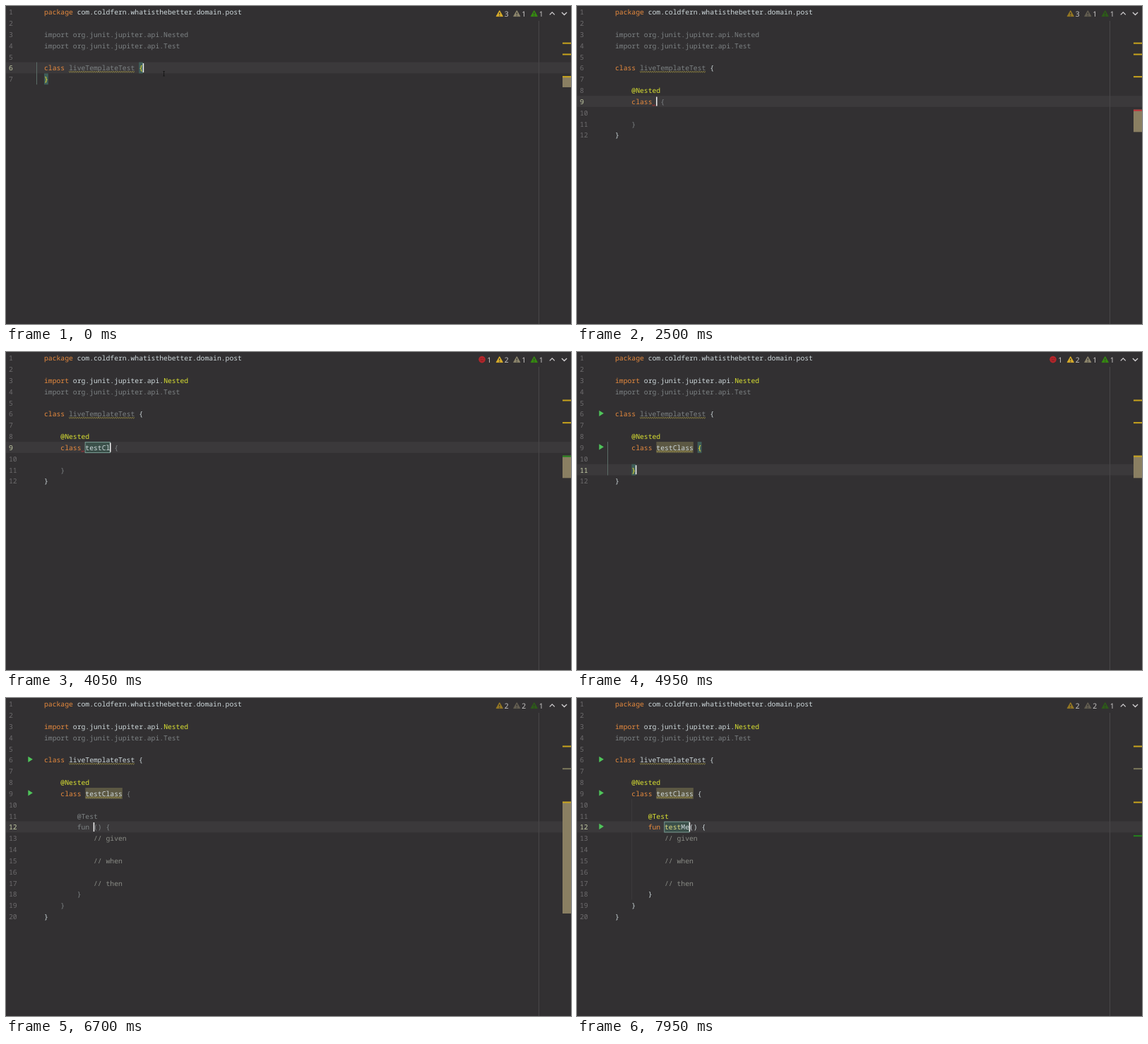
Write an HTML page that moves like this. It is 800 px wide and 450 px high and loops after 8000 ms.

```html
<!DOCTYPE html>
<html lang="en">
<head>
<meta charset="utf-8">
<title>Live templates in an editor</title>
<style>
  html, body { margin: 0; width: 100%; height: 100%; overflow: hidden; background: #323032; }
  svg { display: block; width: 800px; height: 450px; }
  text { font: 9.72px "Noto Sans Mono", "DejaVu Sans Mono", monospace; fill: #cfd9dc; white-space: pre; text-rendering: geometricPrecision; }
  .count { font: 10.4px "Noto Sans", "Open Sans", sans-serif; fill: #c6c4c4; }
  .num { fill: #6d6b6d; }
  .cur { fill: #c6cda6; }
  .key { fill: #e78a3e; }
  .dim { fill: #7d8284; }
  .note { fill: #8a8c86; }
  .ann { fill: #dbe232; }
  .brace { fill: #ffee2c; }
  .fn { fill: #e2dc80; }
  .line { fill: none; }
</style>
</head>
<body>
<svg id="stage" viewBox="0 0 800 450"></svg>
<script>
const LOOP = 8000, PITCH = 15.83, CHAR = 5.833, LEFT = 54;
const YELLOW = '#c8a31c', GREY = '#7b775b', GREEN = '#23821c', RED = '#c03038';
const svg = document.getElementById('stage');

const rowTop = n => 0.4 + (n - 1) * PITCH;
const col = c => LEFT + c * CHAR;
const plain = s => s;
const paint = name => s => `<tspan class="${name}">${s}</tspan>`;
const key = paint('key'), dim = paint('dim'), ann = paint('ann'),
      note = paint('note'), brace = paint('brace'), fn = paint('fn');
const rect = (x, y, w, h, fill, more = '') =>
  `<rect x="${x}" y="${y}" width="${w}" height="${h}" fill="${fill}" ${more}/>`;
const path = (d, stroke, width = 1) =>
  `<path class="line" d="${d}" stroke="${stroke}" stroke-width="${width}"/>`;
const typed = (word, times, t) => word.slice(0, times.filter(at => at <= t).length);

function wave(n, from, to, color) {
  let d = '';
  for (let x = col(from), i = 0; x <= col(to); x += 1.5, i++)
    d += `${i ? 'L' : 'M'}${x} ${rowTop(n) + 12.9 + i % 2 * 1.4}`;
  return path(d, color, 0.9);
}

const cell = (n, c, len, fill) => rect(col(c), rowTop(n), len * CHAR, PITCH, fill);
const braceCell = (n, c) => cell(n, c, 1, '#3f5e59');
const scope = (from, to) => path(`M43.5 ${rowTop(from)}V${rowTop(to + 1)}`, '#5b6c67');
const field = (n, c, len) => len ? rect(col(c) - .2, rowTop(n) + .6, len * CHAR + .4, PITCH - 1, '#3b504a',
  'stroke="#7fa59b" stroke-width=".9"') : '';
const play = n => `<path d="M31.3 ${rowTop(n) + 3.2}l6.6 4.1l-6.6 4.1z" fill="#4fc45a"/>`;

function triangle(x, color) {
  return `<path d="M${x} 6.6l4.6 8h-9.2z" fill="${color}" stroke="${color}" stroke-linejoin="round"/>` +
    path(`M${x} 9v3M${x} 13v1.2`, '#323032', 1.1);
}

function badges(t) {
  const busy = t >= 1200 && t < 2000 || t >= 2150 && t < 3000 || t >= 5650 && t < 6000 || t >= 6150;
  const error = t >= 2750 && t < 5250;
  const colors = busy ? ['#947723', '#625d50', '#2d5b19'] : ['#d8ac2a', '#8b846b', '#358a10'];
  const counts = [t < 2750 ? 3 : 2, t < 5250 ? 1 : 2, 1];
  let out = '';
  counts.forEach((n, i) => {
    out += triangle(698.8 + i * 24.5, colors[i]) +
      `<text class="count" x="${705.8 + i * 24.5}" y="14.9">${n}</text>`;
  });
  if (error)
    out += '<circle cx="674" cy="10.6" r="4.8" fill="#b3262b"/>' +
      path('M672 9.4h1.6M675 9.4h1.4M672 12.3h4', '#7c1d21') +
      '<text class="count" x="681.2" y="14.9">1</text>';
  return out + path('M769.8 12.4l3.5-3.5l3.5 3.5M786.9 9l3.6 3.5l3.6-3.5', '#cfcdcf', 1.3);
}

// Code rows, caret place and decorations for one moment
function editor(t) {
  const nested = t >= 2200, method = t >= 6700, checked = t >= 7600;
  const outer = nested ? plain : t < 700 ? brace : dim;
  const matched = t >= 4700 && t < 5250;
  const name = typed('testClass', [3400, 3500, 3600, 3700, 3900, 4050, 4150, 4300, 4450], t);
  const test = typed('testMe', [7000, 7100, 7200, 7300, 7900, 7950], t);
  const rows = [
    key('package') + ' com.coldfern.whatisthebetter.domain.post', '',
    t < 2600 ? dim('import org.junit.jupiter.api.Nested')
             : key('import') + ' org.junit.jupiter.api.' + ann('Nested'),
    dim('import org.junit.jupiter.api.Test'), '',
    key('class') + ' ' + (t < 5100 ? dim('liveTemplateTest') : 'liveTemplateTest') + ' ' + outer('{')
  ];
  let under = '', over = wave(6, 6, 22, '#a99b48'), caret;

  if (!nested) {
    if (t < 700) {
      caret = [6, 24];
      under += braceCell(6, 23) + braceCell(7, 0) + scope(6, 7);
      over += path('M222.4 92.5h2.4M223.6 92.5v6.5M222.4 99h2.4', '#111', 0.8);
    } else if (t < 1200) {
      rows.push('');
      caret = [7, 4];
    } else {
      const abbr = typed('ne', [1400, 1500], t);
      rows.push('', '    ' + abbr);
      caret = [8, 4 + abbr.length];
    }
  } else {
    const inner = matched ? brace : checked ? plain : dim;
    rows.push('', '    ' + ann('@Nested'), `    ${key('class')} ${name} ${inner('{')}`, '');
    if (method) {
      const soft = checked ? plain : dim;
      const label = checked ? fn(test.slice(0, 4)) + test.slice(4) : test;
      rows.push('        ' + (checked ? ann : dim)('@Test'),
        `        ${(checked ? key : dim)('fun')} ${label}${soft('() {')}`);
      ['given', 'when', 'then'].forEach((word, i) => {
        if (i) rows.push('');
        rows.push('            ' + note('// ' + word));
      });
      rows.push('        ' + soft('}'));
      caret = [12, 12 + test.length];
      under += field(12, 12, test.length);
    } else if (t >= 5650) {
      const abbr = typed('te', [6050, 6150], t);
      rows.push('        ' + abbr);
      caret = [11, 8 + abbr.length];
    } else {
      caret = t < 4600 ? [9, 10 + name.length] : t < 5250 ? [11, 5] : [10, 8];
    }
    rows.push('    ' + inner('}'));
    if (t < 4600) {
      under += field(9, 10, name.length);
      over += wave(9, 9, 10, RED);
    }
    if (matched) under += braceCell(9, 20) + braceCell(11, 4) + scope(9, 11);
    if (t >= 4950) {
      under += cell(9, 10, 9, '#5c5843');
      over += wave(9, 10, 19, '#a99b48') + play(6) + play(9);
    }
    if (checked) {
      under += path(`M77.5 ${rowTop(10)}V${rowTop(19)}`, '#3c3a3c');
      over += play(12);
    }
  }
  rows.push(outer('}'));
  return { rows, caret, under, over };
}

function stripe(t) {
  const mark = (n, color) => rect(788, rowTop(n) + 19.6, 12, 2, color);
  const [from, size] = t < 700 ? [6, 1] : t < 1200 ? [6, 2] : t < 2200 ? [6, 3] :
    t < 5650 ? [9, 2] : t < 6700 ? [9, 3] : t < 7600 ? [9, 10] : [9, 0];
  let out = rect(788, rowTop(from) + 19.6, 12, size * PITCH, '#8a7f62');
  if (t < 2600) out += mark(3, YELLOW);
  out += mark(4, YELLOW) + mark(6, t < 5100 ? YELLOW : GREY);
  if (t >= 2200) out += mark(9, t < 3700 ? RED : t < 4950 ? GREEN : YELLOW);
  if (t >= 7000) out += mark(12, GREEN);
  return out;
}

function draw(t) {
  const { rows, caret: [row, at], under, over } = editor(t);
  const text = rows.map((code, i) => {
    const y = rowTop(i + 1) + 11.9;
    return `<text class="${i + 1 === row ? 'cur' : 'num'}" x="4" y="${y}">${i + 1}</text>` +
      `<text x="${LEFT}" y="${y}">${code}</text>`;
  }).join('');
  const blink = t >= 3250 && t < 3400;
  return rect(0, 0, 800, 450, '#323032') +
    rect(0, rowTop(row), 800, PITCH, '#3b393b') +
    path('M754.5 21V450', '#484648') + under + text + over +
    (blink ? '' : rect(col(at) - .3, rowTop(row) + 1.5, 1.5, 13, '#f2f2f2')) +
    stripe(t) + badges(t);
}

let shown = '';
const began = performance.now();
function tick() {
  const picture = draw((performance.now() - began) % LOOP);
  if (picture !== shown) svg.innerHTML = shown = picture;
  requestAnimationFrame(tick);
}
tick();
</script>
</body>
</html>
```
